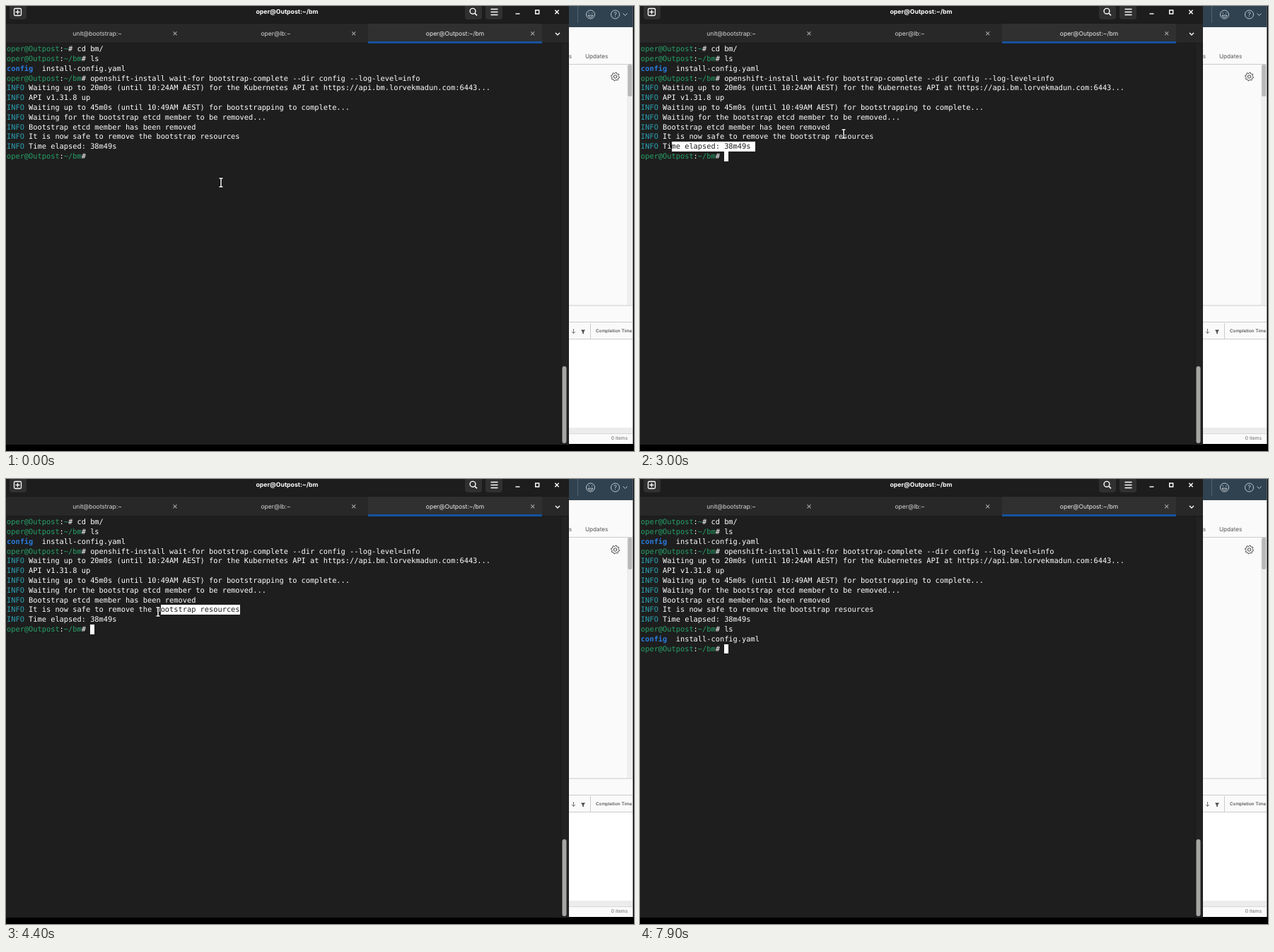
These frames come from a looping animation (888x630 px, 8000 ms). An HTML page with a canvas:

```html
<!DOCTYPE html>
<html lang="en">
<head>
<meta charset="utf-8">
<title>Terminal</title>
<style>
  html, body { margin: 0; width: 100%; height: 100%; overflow: hidden; background: #000; }
  canvas { display: block; }
</style>
</head>
<body>
<canvas id="stage" width="888" height="630"></canvas>
<script>
const ctx = document.getElementById('stage').getContext('2d');
const LOOP = 8000, STEP = 100;
const CELL = 6.218, ROW = 13.8, LEFT = 1, TOP = 54.2, COLS = 126;
const BG = '#1e1e1e', WHITE = '#ffffff', GREEN = '#26a269', CYAN = '#2aa1b3', BLUE = '#2a7bde';
const MONO = '10.33px "DejaVu Sans Mono", monospace';
const UI = 'Inter, sans-serif';

// A line is a list of [text, colour, bold] runs.
const HOST = 'oper@Outpost';
const prompt = (dir, command = '') => [[HOST, GREEN], [':', WHITE], [dir, GREEN], ['# ' + command, WHITE]];
const info = text => [['INFO', CYAN], [' ' + text, WHITE]];
const listing = [['config', BLUE, true], ['  install-config.yaml', WHITE]];
const history = [
  prompt('~', 'cd bm/'),
  prompt('~/bm', 'ls'),
  listing,
  prompt('~/bm', 'openshift-install wait-for bootstrap-complete --dir config --log-level=info'),
  info('Waiting up to 20m0s (until 10:24AM AEST) for the Kubernetes API at https://api.bm.lorvekmadun.com:6443...'),
  info('API v1.31.8 up'),
  info('Waiting up to 45m0s (until 10:49AM AEST) for bootstrapping to complete...'),
  info('Waiting for the bootstrap etcd member to be removed...'),
  info('Bootstrap etcd member has been removed'),
  info('It is now safe to remove the bootstrap resources'),
  info('Time elapsed: 38m49s'),
];

const TYPE_AT = 7800, OUTPUT_AT = 7900;
const blinks = [400, 1000, 1600, 2200, 2800, 3400, 4000, 4600, 5200, 5700, 6400, 7000, 7500];
const drags = [
  { from: 2200, to: 2800, clear: 3700 },
  { from: 3700, to: 5150, clear: 6000 },
];
const path = [
  [0, 304, 250], [300, 309, 254], [900, 325, 196], [1100, 329, 193], [1200, 329, 193],
  [1800, 161, 201], [1900, 161, 201], [2000, 159, 201], [2200, 162, 200], [2800, 42, 198],
  [3000, 288, 181], [3200, 326, 179], [3500, 330, 185], [3700, 330, 186], [4000, 265, 195],
  [4100, 228, 192], [4500, 211, 187], [5000, 19, 186], [5100, 15, 186], [5200, 16, 184],
  [5400, 205, 162], [5700, 259, 157], [5800, 259, 158], [6100, 455, 214], [6400, 424, 204],
  [6500, 424, 204], [6700, 415, 205],
];

function pointerAt(t) {
  const next = path.findIndex(key => key[0] > t);
  if (next < 0) return path.at(-1).slice(1);
  const [t0, x0, y0] = path[next - 1], [t1, x1, y1] = path[next];
  const k = (t - t0) / (t1 - t0);
  return [x0 + (x1 - x0) * k, y0 + (y1 - y0) * k];
}

// Selected range as ordered cell offsets; it trails the pointer slightly.
function selectionAt(t) {
  const drag = drags.find(d => t >= d.from && t < d.clear);
  if (!drag) return [0, 0];
  const offset = time => {
    const [x, y] = pointerAt(time);
    return Math.floor((y - TOP) / ROW) * COLS + Math.round((x - LEFT) / CELL);
  };
  return [offset(drag.from), offset(Math.max(drag.from, Math.min(t - 25, drag.to)))].sort((a, b) => a - b);
}

function rect(x, y, w, h, color) {
  ctx.fillStyle = color;
  ctx.fillRect(x, y, w, h);
}

function label(text, x, y, size, color, align = 'left', weight = 400) {
  ctx.font = `${weight} ${size}px ${UI}`;
  ctx.textAlign = align;
  ctx.fillStyle = color;
  ctx.fillText(text, x, y);
}

function stroke(d, color, width = 1) {
  ctx.strokeStyle = color;
  ctx.lineWidth = width;
  ctx.stroke(new Path2D(d));
}

function circle(x, y, r, color, width = 1) {
  ctx.beginPath();
  ctx.arc(x, y, r, 0, 7);
  ctx.strokeStyle = color;
  ctx.lineWidth = width;
  ctx.stroke();
}

function roundRect(x, y, w, h, r, color) {
  ctx.beginPath();
  ctx.roundRect(x, y, w, h, r);
  ctx.fillStyle = color;
  ctx.fill();
}

const cross = (x, y, r, color, width) =>
  stroke(`M${x - r} ${y - r}l${2 * r} ${2 * r}m0 ${-2 * r}l${-2 * r} ${2 * r}`, color, width);

function drawGear(x, y) {
  ctx.beginPath();
  for (let i = 0; i < 32; i++) {
    const a = (i + 0.5) * Math.PI / 16, r = i % 4 < 2 ? 6 : 4.6;
    ctx.lineTo(x + r * Math.cos(a), y + r * Math.sin(a));
  }
  ctx.closePath();
  ctx.strokeStyle = '#444';
  ctx.lineWidth = 1;
  ctx.stroke();
  circle(x, y, 2.2, '#444');
}

function drawBrowser() {
  rect(780, 0, 106.5, 620, '#fafafa');
  rect(780, 0, 106.5, 30, '#304250');
  rect(808, 0, 1, 24, '#52626e');
  const icon = '#c3cbd1';
  circle(826.5, 12, 6, icon);
  stroke('M823 13.2a3.6 3.6 0 0 0 7 0zM824.3 9.3v1.4M828.7 9.3v1.4', icon);
  circle(861.5, 12, 6, icon);
  label('?', 861.5, 15.2, 9, icon, 'center');
  stroke('M872.5 10.5l3 3l3-3', icon);

  label('ts', 800, 74, 8.2, '#565656', 'right');
  label('Updates', 819, 74, 8.2, '#565656');
  rect(795, 82, 91, 1, '#cccccc');
  rect(878, 83, 8, 341, '#eeeeee');
  roundRect(879.2, 83, 6, 45, 2.5, '#b9b9b9');
  drawGear(861.5, 100);

  rect(795, 423, 91, 2, '#e3e3e3');
  rect(795, 447, 91, 1, '#cccccc');
  rect(795, 472, 91, 125, WHITE);
  rect(795, 471, 91, 1, '#cccccc');
  rect(826, 449, 1, 22, '#cccccc');
  stroke('M802.5 457v6.5m-2.5-2.5l2.5 2.5l2.5-2.5', '#666', 0.9);
  ctx.fillStyle = '#444';
  ctx.fill(new Path2D('M813 458.5h6l-2.2 3v3l-1.6-1v-2z'));
  label('Completion Time', 834, 462, 6.3, '#454545', 'left', 500);
  rect(795, 597, 91, 8, '#ececec');
  rect(795, 605, 91, 1, '#d8d8d8');
  label('0 items', 879, 614.3, 6.7, '#6a6a6a', 'right');
}

function drawWindow() {
  rect(0, 0, 796, 621, BG);
  rect(0, 0, 796, 25, '#1d1d1d');
  for (const x of [5, 649, 678]) roundRect(x, -5, 24, 24, 4, '#303030');
  ctx.beginPath();
  ctx.roundRect(11.5, 3.5, 10, 10, 1.5);
  ctx.strokeStyle = WHITE;
  ctx.lineWidth = 1.3;
  ctx.stroke();
  stroke('M16.5 5.5v6M13.5 8.5h6', WHITE, 1.3);
  label(HOST + ':~/bm', 397.5, 11, 8.7, WHITE, 'center', 700);
  circle(660, 7.3, 3.9, WHITE, 1.4);
  stroke('M662.8 10.2l3.2 3.2', WHITE, 1.6);
  stroke('M685.5 4.5h10M685.5 8.5h10M685.5 12.5h10', WHITE, 1.3);
  stroke('M720.5 11h6', WHITE, 1.4);
  stroke('M748.7 6h5v5h-5z', WHITE, 1.4);
  cross(779, 8.5, 2.7, WHITE, 1.4);

  rect(0, 25, 796, 28, '#282828');
  rect(0, 24, 796, 1, '#191919');
  rect(0, 52, 796, 1, '#191919');
  rect(512, 25, 246, 25, '#303030');
  rect(512, 50, 246, 3, '#15539e');
  label('unit@bootstrap:~', 129, 41.6, 8.5, '#d6d6d6', 'center');
  label('oper@lb:~', 381.5, 41.6, 8.5, '#d6d6d6', 'center');
  label(HOST + ':~/bm', 635, 41.6, 8.5, '#eeeeee', 'center');
  for (const x of [239, 491.7, 744.7]) cross(x, 38.8, 2.5, '#a0a0a0', 1.2);
  stroke('M777 38l3 3l3-3', WHITE, 1.4);

  rect(785, 53, 10, 568, '#222222');
  rect(784.5, 53, 1, 568, '#181818');
  roundRect(786.5, 510, 6, 109, 3, '#a5a5a3');
}

const cellX = col => Math.round(LEFT + col * CELL);
const rowY = row => Math.round(TOP + row * ROW);

function fillCells(row, from, to, color) {
  rect(cellX(from), rowY(row), cellX(to) - cellX(from), rowY(row + 1) - rowY(row), color);
}

function drawLine(runs, row, [start, end]) {
  const from = Math.max(0, start - row * COLS), to = Math.min(COLS, end - row * COLS);
  if (to > from) fillCells(row, from, to, WHITE);
  ctx.textAlign = 'left';
  let col = 0;
  for (const [text, color, bold] of runs) {
    ctx.font = (bold ? 'bold ' : '') + MONO;
    for (const char of text) {
      const selected = col >= from && col < to;
      if (selected) fillCells(row, col, col + 1, color);
      ctx.fillStyle = selected ? BG : color;
      ctx.fillText(char, LEFT + col * CELL, TOP + row * ROW + 10);
      col++;
    }
  }
  return col;
}

function drawPointer(x, y) {
  x = Math.round(x);
  y = Math.round(y);
  const beam = `M${x - 2.5} ${y - 6}h2l.5 .5l.5-.5h2M${x} ${y - 5.5}v11M${x - 2.5} ${y + 6}h2l.5-.5l.5 .5h2`;
  stroke(beam, '#000', 3);
  stroke(beam, WHITE, 1.5);
}

function draw() {
  const now = performance.now() % LOOP;
  const t = Math.floor(now / STEP) * STEP;
  rect(0, 0, 888, 630, '#000');
  drawBrowser();
  drawWindow();

  const lines = [...history, prompt('~/bm', t >= TYPE_AT ? 'ls' : '')];
  if (t >= OUTPUT_AT) lines.push(listing, prompt('~/bm'));
  const selection = selectionAt(t);
  let col = 0;
  lines.forEach((runs, row) => { col = drawLine(runs, row, selection); });

  const cursorOn = blinks.filter(b => b <= t).length % 2;
  if (cursorOn) fillCells(lines.length - 1, col, col + 1, WHITE);
  if (t < TYPE_AT) drawPointer(...pointerAt(t));
  requestAnimationFrame(draw);
}
ctx.textRendering = 'geometricPrecision';
draw();
</script>
</body>
</html>
```
